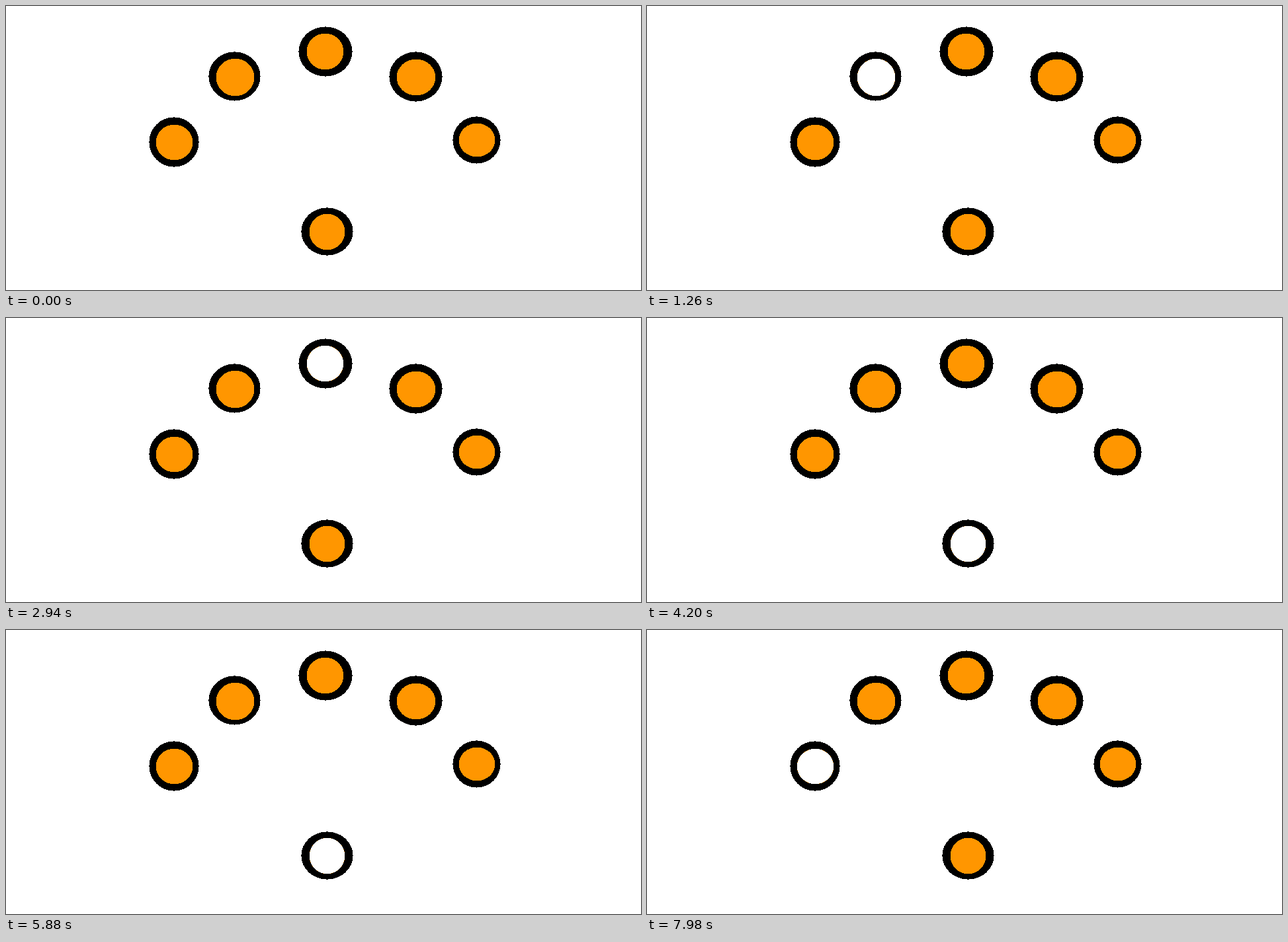
These frames come from a looping animation (960 px wide and 430 px high, 8 s). An HTML page:

```html
<!DOCTYPE html>
<html lang="en">
<head>
<meta charset="utf-8">
<title>Lights</title>
<style>
  html, body { margin: 0; width: 100%; height: 100%; overflow: hidden; background: #fff; }
  svg { display: block; width: 960px; height: 430px; }
</style>
</head>
<body>
<svg id="stage" viewBox="0 0 960 430" shape-rendering="crispEdges"></svg>
<script>
const NS = 'http://www.w3.org/2000/svg';
const LOOP = 8000, STEP = 210, ROUND = 8 * STEP;
const BASE = 5;

// Bounds (left, top, right, bottom) of each ring and its lamp; the base light is last.
const lights = [
  { ring: [217, 169, 291, 243], lamp: [227, 180, 282, 233] },
  { ring: [307, 70, 384, 143], lamp: [318, 80, 375, 136] },
  { ring: [443, 32, 523, 106], lamp: [455, 42, 510, 96] },
  { ring: [580, 70, 659, 144], lamp: [591, 81, 649, 135] },
  { ring: [676, 168, 747, 238], lamp: [685, 178, 739, 228] },
  { ring: [447, 306, 524, 377], lamp: [459, 315, 512, 369] }
];

const stage = document.getElementById('stage');

function ellipse([left, top, right, bottom], fill, grow) {
  const el = document.createElementNS(NS, 'ellipse');
  const attrs = {
    cx: (left + right) / 2,
    cy: (top + bottom) / 2,
    rx: (right - left) / 2 + grow,
    ry: (bottom - top) / 2 + grow,
    fill
  };
  for (const name in attrs) el.setAttribute(name, attrs[name]);
  stage.appendChild(el);
  return el;
}

// Edges are unsmoothed, so shapes grow a little to fill their outermost pixels.
const flashes = lights.map(({ ring, lamp }) => {
  ellipse(ring, '#000', 0.6);
  ellipse(lamp, '#ff9600', 0.4);
  return ellipse(lamp, '#fff', 0.2);
});

// Each round rests, then flashes base, two neighbours, base; the last rest is one step longer.
function litAt(time) {
  const round = Math.floor(time / ROUND);
  const rest = round === 4 ? 5 : 4;
  const step = Math.floor((time - round * ROUND) / STEP) - rest;
  if (step < 0) return -1;
  if (round === 4) return step === 0 ? BASE : 0;
  return [BASE, round, round + 1, BASE][step];
}

function draw(time) {
  const lit = litAt(time);
  flashes.forEach((el, i) => el.setAttribute('visibility', i === lit ? 'visible' : 'hidden'));
}

const start = performance.now();
function tick() {
  draw((performance.now() - start) % LOOP);
  requestAnimationFrame(tick);
}
draw(0);
requestAnimationFrame(tick);
</script>
</body>
</html>
```
